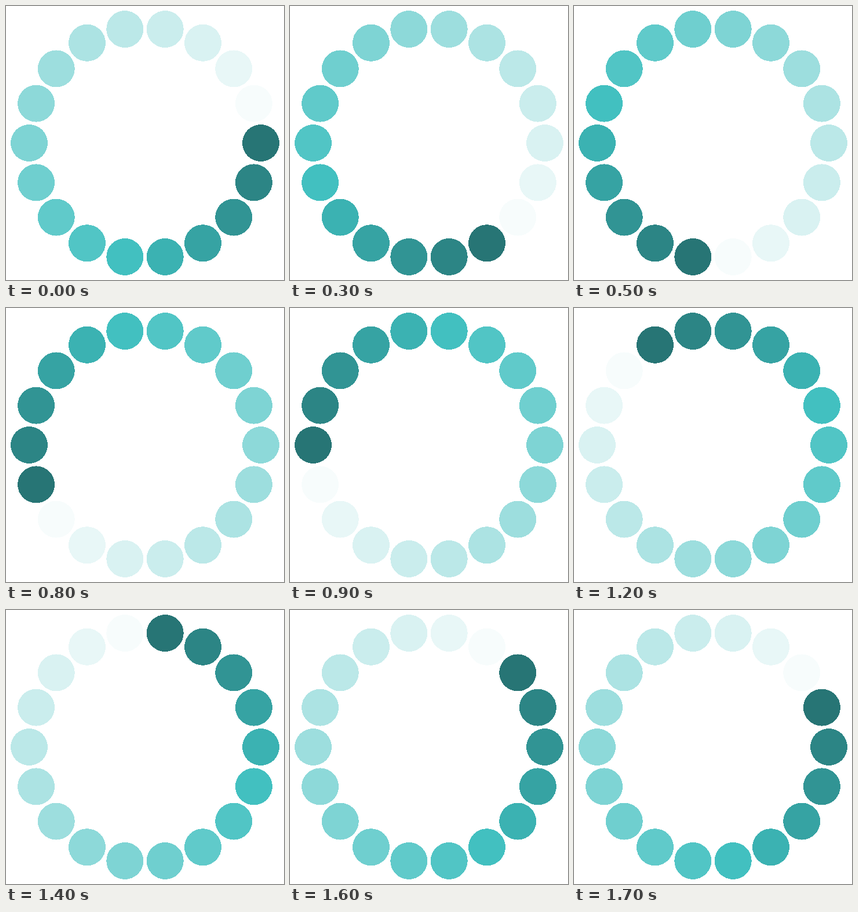
Recreate the animation shown at these times as an HTML page. Size 480 by 474 pixels, loop 1800 ms.

```html
<!DOCTYPE html>
<html lang="en">
<head>
<meta charset="utf-8">
<title>Ring spinner</title>
<style>
  html, body { margin: 0; width: 100%; height: 100%; overflow: hidden; background: #fff; }
  svg { display: block; }
</style>
</head>
<body>
<svg width="480" height="474" shape-rendering="crispEdges"></svg>
<script>
const COUNT = 18, STEP_MS = 100;
const CENTER_X = 240, CENTER_Y = 237, RING = 200, DOT = 32;
const svg = document.querySelector('svg');

const dots = Array.from({ length: COUNT }, (_, i) => {
  const angle = i / COUNT * 2 * Math.PI;
  const dot = document.createElementNS('http://www.w3.org/2000/svg', 'circle');
  dot.setAttribute('cx', CENTER_X + RING * Math.cos(angle));
  dot.setAttribute('cy', CENTER_Y + RING * Math.sin(angle));
  dot.setAttribute('r', DOT);
  return svg.appendChild(dot);
});

// The darkest dot moves clockwise; the dots ahead of it grow steadily lighter.
function draw(ms) {
  const head = Math.floor(ms / STEP_MS) % COUNT;
  dots.forEach((dot, i) => {
    const ahead = (i - head + COUNT) % COUNT;
    dot.setAttribute('fill', `hsl(180, 50%, ${30.7 + 3.96 * ahead}%)`);
  });
}

const start = performance.now();
function tick() {
  draw(performance.now() - start);
  requestAnimationFrame(tick);
}
tick();
</script>
</body>
</html>
```
